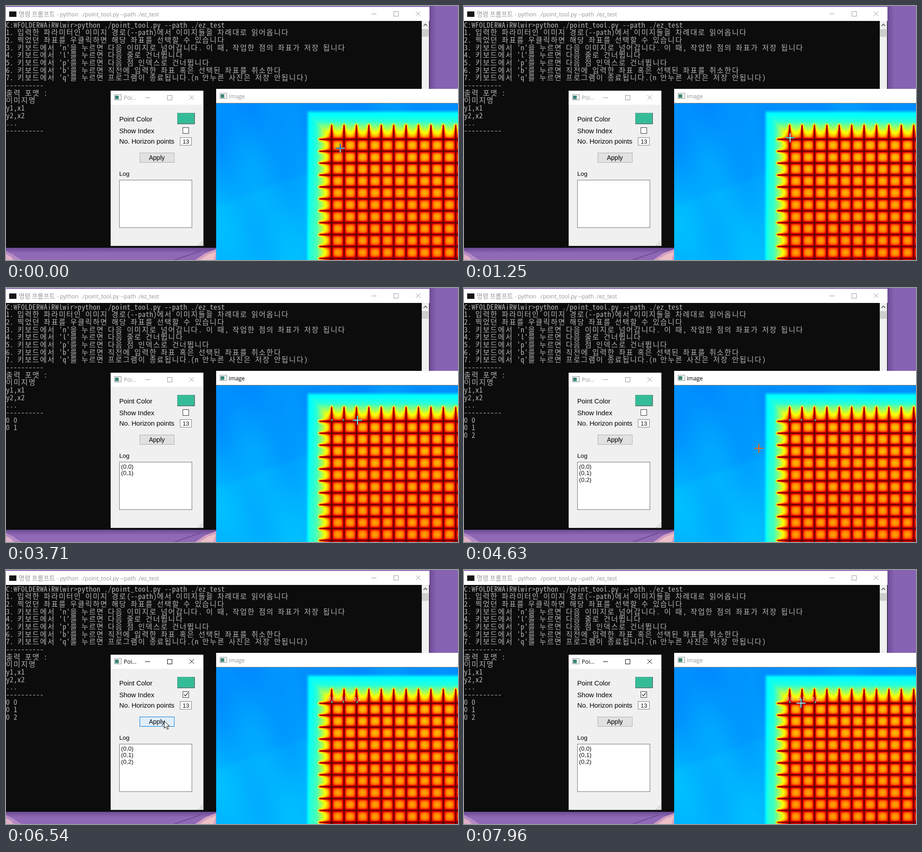
These frames come from a looping animation (998x561 px, 8000 ms). An HTML page with a canvas:

```html
<!DOCTYPE html>
<html lang="ko">
<head>
<meta charset="utf-8">
<title>Point tool</title>
<style>
  html, body { margin: 0; width: 100%; height: 100%; overflow: hidden; background: #8763b3; }
  canvas { display: block; }
</style>
</head>
<body>
<canvas id="stage" width="998" height="561"></canvas>
<script>
const W = 998, H = 561, LOOP = 8000;
const UI = '"Open Sans", "Noto Sans CJK KR", sans-serif';
const ARIAL = '"Liberation Sans", Arial, sans-serif';
const MONO = '"Noto Sans Mono CJK KR", "Noto Sans CJK KR", "Noto Sans CJK", monospace';
const CELL = 25 / 3, ROW = 50 / 3;
const VIEW = { x: 464, y: 215, w: 534, h: 346 };

const stage = document.getElementById('stage').getContext('2d');
let g = stage;

const clamp = (v, lo = 0, hi = 1) => Math.min(hi, Math.max(lo, v));
const smooth = (a, b, v) => { const k = clamp((v - a) / (b - a)); return k * k * (3 - 2 * k); };
const bell = v => Math.exp(-v * v);

function layer(w, h, paint) {
  const c = document.createElement('canvas');
  c.width = w;
  c.height = h;
  g = c.getContext('2d');
  paint();
  g = stage;
  return c;
}
function box(x, y, w, h, fill, edge) {
  g.fillStyle = edge || fill;
  g.fillRect(x, y, w, h);
  if (edge) {
    g.fillStyle = fill;
    g.fillRect(x + 1, y + 1, w - 2, h - 2);
  }
}
function text(s, x, y, font, color, align = 'left') {
  g.font = font;
  g.fillStyle = color;
  g.textAlign = align;
  g.fillText(s, x, y);
}
function line(points, color, width = 1) {
  g.beginPath();
  points.forEach(([x, y]) => g.lineTo(x, y));
  g.strokeStyle = color;
  g.lineWidth = width;
  g.stroke();
}
function shape(points, fill) {
  g.beginPath();
  points.forEach(([x, y]) => g.lineTo(x, y));
  g.closePath();
  g.fillStyle = fill;
  g.fill();
}
function fade(x, y, w, h, x2, y2, from, to) {
  const grad = g.createLinearGradient(x, y, x2, y2);
  grad.addColorStop(0, from);
  grad.addColorStop(1, to);
  g.fillStyle = grad;
  g.fillRect(x, y, w, h);
}

// Terminal text sits on a cell grid; Hangul takes two cells.
function consoleRow(s, row) {
  let col = 0;
  for (const ch of s) {
    text(ch, col * CELL, 47.5 + row * ROW, `300 16px ${MONO}`, '#b4b4b4');
    col += ch >= '가' && ch <= '힣' ? 2 : 1;
  }
}
function windowButtons(x, y, color) {
  line([[x, y + .5], [x + 11, y + .5]], color);
  g.strokeRect(x + 49.5, y - 4.5, 10, 10);
  line([[x + 98, y - 5], [x + 108, y + 5]], color);
  line([[x + 108, y - 5], [x + 98, y + 5]], color);
}
function appIcon(x, y) {
  box(x, y, 16, 13, '#f4f6f6', '#8b9494');
  fade(x + 2, y + 3, 8, 8, x + 10, y + 11, '#2d6f78', '#4f9b72');
}

// Hot core with a wide glow; the free end of each wire tapers.
function wireHeat(across, along, pitch) {
  const nearest = pitch * Math.max(0, Math.round(across / pitch));
  const d = (across - nearest) / (.6 + .4 * smooth(0, 28, along));
  return (.64 * bell(d / 2.7) + .36 * bell(d / 6.5)) * smooth(-4, 4, along);
}

// Heated wire grid in front of a cool wall.
function temperature(x, y) {
  const wall = .267 + .03 * smooth(215, 520, y)
    + .005 * Math.sin(x / 37 + y / 61) + .004 * Math.sin(x / 19 - y / 43)
    + .007 * smooth(-8, 8, y - 440 + (x - 465) * .35)
    - .008 * bell((x - 610) / 22) * bell((y - 245) / 60);
  const inX = x - 665, inY = y - 232;
  const panel = smooth(-5, 6, inX) * smooth(-5, 6, inY);
  const depth = Math.min(inX / 56, inY / 62);
  const plate = .36 + .07 * clamp(depth * 2) + .25 * smooth(.28, 1, depth) + .035 * smooth(250, 560, y);
  const v = wall + (plate - wall) * panel;
  const cool = (1 - wireHeat(x - 718.5, y - 261, 27.4)) * (1 - wireHeat(y - 294, x - 690, 26.3));
  return 1.02 - (1.02 - v) * cool;
}

const scene = layer(W, H, () => {
  // Desktop
  box(0, 0, W, H, '#8763b3');
  fade(935, 0, 63, 184, 950, 0, '#6d4b96', '#8763b3');
  fade(0, 534, 464, 27, 0, 546, '#6b4a92', '#8f69b6');
  shape([[0, 541], [16, 549], [34, 561], [0, 561]], '#b58bc4');
  shape([[0, 548], [10, 553], [17, 561], [0, 561]], '#e0b0c8');
  shape([[418, 561], [440, 546], [464, 537], [464, 561]], '#d3a0c0');
  shape([[428, 561], [446, 549], [464, 543], [458, 561]], '#edbfc6');
  line([[372, 561], [430, 541]], '#6f4c98', 2);

  // Command prompt
  box(0, 2, 935, 532, '#0c0c0c');
  box(0, 2, 935, 31, '#fff');
  box(7, 12, 16, 12, '#161616');
  text('명령 프롬프트', 28, 22.5, `14px "Noto Sans CJK KR", ${UI}`, '#949494');
  text('- python  ./point_tool.py --path ./ez_test', 112, 22.5, `12.4px ${UI}`, '#949494');
  windowButtons(807, 17, '#999');
  box(918, 33, 16, 500, '#f0f0f0');
  box(918, 51, 15, 17, '#cdcdcd');
  line([[922, 44], [926, 40], [930, 44]], '#505050', 1.6);
  [
    'C:₩FOLDER₩AiR₩lwir>python ./point_tool.py --path ./ez_test',
    '1. 입력한 파라미터인 이미지 경로(--path)에서 이미지들을 차례대로 읽어옵니다',
    '2. 찍었던 좌표를 우클릭하면 해당 좌표를 선택할 수 있습니다',
    "3. 키보드에서 'n'을 누르면 다음 이미지로 넘어갑니다. 이 때, 작업한 점의 좌표가 저장 됩니다",
    "4. 키보드에서 'l'를 누르면 다음 줄로 건너뜁니다",
    "5. 키보드에서 'p'를 누르면 다음 점 인덱스로 건너뜁니다",
    "6. 키보드에서 'b'를 누르면 직전에 입력한 좌표 혹은 선택된 좌표를 취소한다",
    "7. 키보드에서 'q'를 누르면 프로그램이 종료됩니다.(n 안누른 사진은 저장 안됩니다)",
    '----------', '출력 포맷 :', '이미지명', 'y1,x1', 'y2,x2', '...', '----------'
  ].forEach(consoleRow);

  // Image window, coloured with the jet map
  box(VIEW.x, 183, VIEW.w, 31, '#fff');
  box(VIEW.x, 214, VIEW.w, 1, '#9a8a70');
  appIcon(472, 192);
  const img = g.createImageData(VIEW.w, VIEW.h);
  const band = (v, mid) => 255 * clamp(1.5 - Math.abs(4 * v - mid));
  for (let y = 0, i = 0; y < VIEW.h; y++) {
    for (let x = 0; x < VIEW.w; x++) {
      const v = temperature(x + VIEW.x, y + VIEW.y);
      for (const c of [band(v, 3), band(v, 2), band(v, 1), 255]) img.data[i++] = c;
    }
  }
  g.putImageData(img, VIEW.x, VIEW.y);

  // Settings window
  box(231, 187, 205, 343, '#f0f0f0', '#d8d8d8');
  box(231, 187, 204, 31, '#fff');
  appIcon(239, 195);
  text('Point Color', 250, 255, `14.8px ${ARIAL}`, '#000');
  text('Show Index', 250, 280.5, `14.8px ${ARIAL}`, '#000');
  text('No. Horizon points', 250, 304, `14.8px ${ARIAL}`, '#000');
  text('Log', 250, 375, `13.6px ${ARIAL}`, '#000');
  box(378, 236, 39, 25, '#3b5f56');
  box(378, 236, 38, 24, '#34bc98', '#5f9f8e');
  box(384, 290, 26, 18, '#fff', '#7a7a7a');
  text('13', 390, 303.5, `13px ${ARIAL}`, '#111');
  box(250, 384, 161, 106, '#fff', '#707070');
  for (let i = 0; i < 3; i++)
    for (let j = 0; j <= i; j++) box(432 - j * 4, 519 + i * 4, 2, 2, '#b4b4b4');
});

const marks = [
  { at: 1560, x: 719.5, y: 291.5 },
  { at: 2500, x: 745, y: 291 },
  { at: 3900, x: 775.5, y: 292 }
];
const CHECK_AT = 5420, APPLY_AT = 6380;
const path = [
  [0, 738, 314], [130, 738, 314], [950, 720, 291], [1750, 720, 291], [2200, 751, 290],
  [2260, 751, 290], [2420, 745, 291], [2650, 745, 291], [3500, 776, 292], [4050, 776, 292],
  [4600, 651, 354], [4670, 651, 354], [5260, 396, 274], [5600, 396, 274], [6180, 349, 333],
  [6800, 349, 333], [7550, 744, 294], [8000, 744, 294]
];

function pointerAt(t) {
  const i = path.findIndex(p => p[0] > t);
  const [a, b] = [path[i - 1], path[i]];
  const k = smooth(a[0], b[0], t);
  return [a[1] + (b[1] - a[1]) * k, a[2] + (b[2] - a[2]) * k].map(Math.round);
}
function drawPointer(x, y) {
  if (x > VIEW.x && y > VIEW.y) {
    g.globalCompositeOperation = 'difference';
    g.beginPath();
    g.rect(x - 10, y - 1, 20, 2);
    g.rect(x - 1, y - 10, 2, 20);
    g.fillStyle = '#fff';
    g.fill();
    g.globalCompositeOperation = 'source-over';
    return;
  }
  const arrow = [[0, 0], [0, 16], [4, 12.5], [6.5, 18.5], [9, 17.5], [6.5, 11.5], [11.5, 11.5]]
    .map(([dx, dy]) => [x + dx + .5, y + dy + .5]);
  shape(arrow, '#fff');
  line([...arrow, arrow[0]], '#000');
}

function draw(t) {
  g.drawImage(scene, 0, 0);

  const [px, py] = pointerAt(t);
  const settingsActive = t >= CHECK_AT, imageActive = t >= marks[0].at && !settingsActive;
  const tint = active => active ? '#000' : '#949494';
  text('image', 492, 203.5, `12.4px ${UI}`, tint(imageActive));
  text('Poi...', 260, 206.5, `12.4px ${UI}`, tint(settingsActive));
  windowButtons(307, 202, tint(settingsActive));

  box(390, 268, 14, 14, '#fff', '#333');
  if (settingsActive) line([[393, 275], [396, 278], [401.5, 271.5]], '#222', 1.4);
  const hover = px >= 295 && px < 372 && py >= 324 && py < 346;
  box(295, 324, 77, 22, hover ? '#e0eefa' : '#e1e1e1', hover ? '#0078d7' : '#adadad');
  text('Apply', 333, 340, `14px ${ARIAL}`, '#000', 'center');

  marks.forEach(({ at, x, y }, i) => {
    if (t < at) return;
    consoleRow(`0 ${i}`, 15 + i);
    text(`(0,${i})`, 254, 399 + i * 14.3, `13.4px ${ARIAL}`, '#111');
    g.beginPath();
    g.arc(x, y, 1.8, 0, 7);
    g.fillStyle = '#4fc8ab';
    g.fill();
    if (t >= APPLY_AT) text(`0,${i}`, x, y - 3.5, `11.5px ${ARIAL}`, '#f4f0e8', 'center');
  });
  drawPointer(px, py);
}

function tick() {
  draw(performance.now() % LOOP);
  requestAnimationFrame(tick);
}
tick();
</script>
</body>
</html>
```
